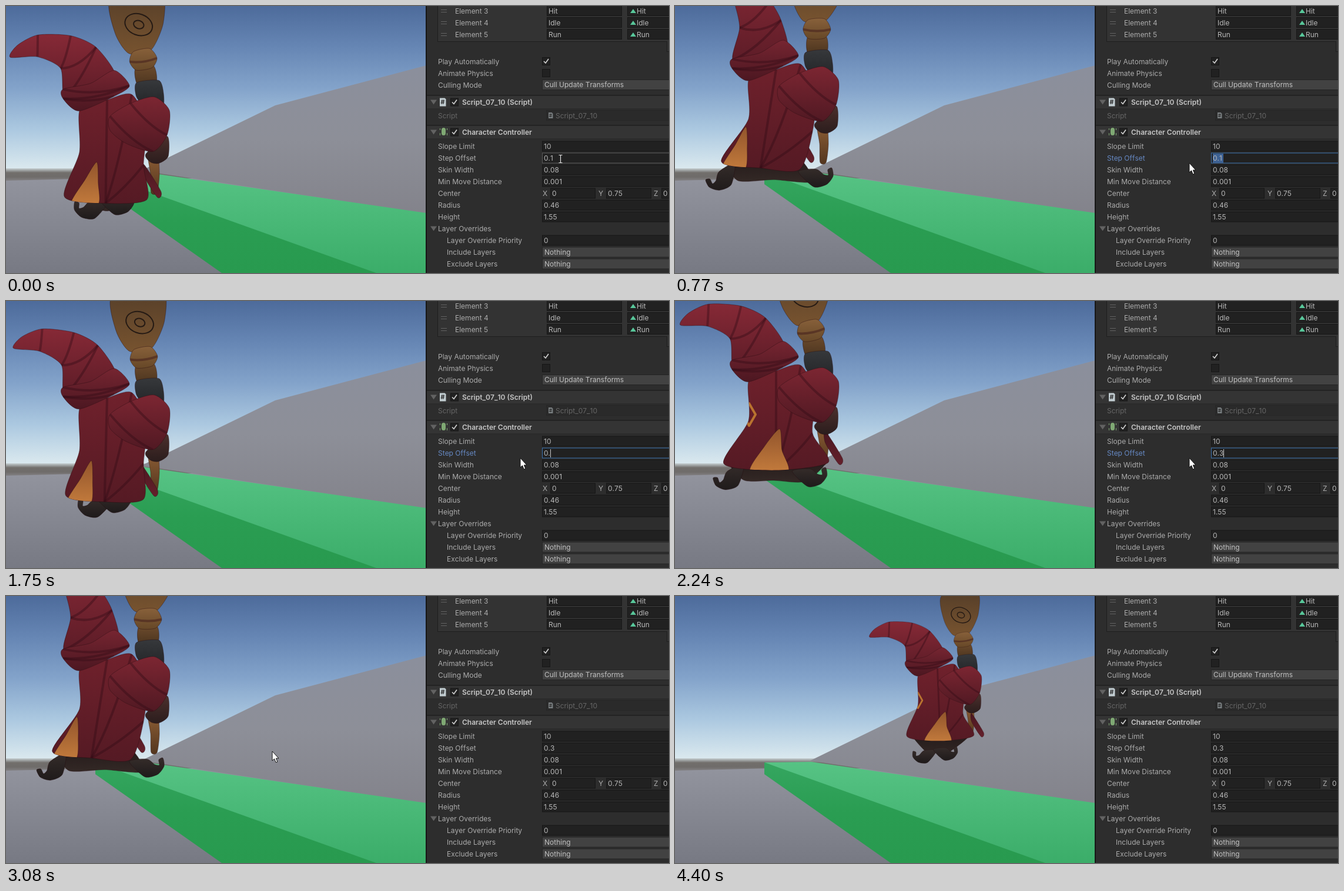
These frames come from a looping animation (1128 px wide and 454 px high, 4.47 s). An HTML page with a canvas:

```html
<!DOCTYPE html>
<html lang="en">
<head>
<meta charset="utf-8">
<title>Step offset demo</title>
<style>
html, body { margin: 0; width: 100%; height: 100%; overflow: hidden; background: #2d2d2d; }
canvas { display: block; }
</style>
</head>
<body>
<canvas id="stage" width="1128" height="454"></canvas>
<script>
const ctx = document.getElementById('stage').getContext('2d');
const LOOP = 4470, STEP = 70, CYCLE = 577.5, WALK = 3400;
const mix = (a, b, u) => a + (b - a) * u;
const clamp = u => Math.max(0, Math.min(1, u));
const ramp = (t, from, to) => clamp((t - from) / (to - from));
const smooth = u => u * u * (3 - 2 * u);

// ---------- basic drawing ----------
function rect(x, y, w, h, fill) { ctx.fillStyle = fill; ctx.fillRect(x, y, w, h); }
function grad(y0, y1, ...colors) {
  const g = ctx.createLinearGradient(0, y0, 0, y1);
  colors.forEach((color, i) => g.addColorStop(i / (colors.length - 1), color));
  return g;
}
function trace(points) {
  ctx.beginPath();
  for (let i = 0; i < points.length; i += 2) ctx.lineTo(points[i], points[i + 1]);
}
function poly(points, fill) {
  trace(points);
  ctx.fillStyle = fill;
  ctx.fill();
}
function line(points, color, width) {
  trace(points);
  ctx.strokeStyle = color;
  ctx.lineWidth = width;
  ctx.stroke();
}
function text(str, x, y, color = '#acacac', weight = 400, size = 12) {
  ctx.font = `${weight} ${size}px Inter, Roboto, sans-serif`;
  ctx.fontKerning = 'none';
  ctx.textBaseline = 'middle';
  ctx.fillStyle = color;
  ctx.fillText(str, x, y + 1);
}

// ---------- scene ----------
function scene() {
  rect(0, 0, 715, 279, grad(0, 279, '#4d6b9b', '#6686b4', '#83a3ca', '#abc8e0', '#dceaef'));
  rect(0, 276, 715, 22, grad(276, 298, '#c6d0d3', '#726f6c', '#6f6c6a', '#858386'));
  poly([0, 297, 160, 293, 715, 293, 715, 454, 0, 454], grad(293, 454, '#92949e', '#777983'));
  poly([230, 280, 458, 169, 715, 101, 715, 353], grad(101, 353, '#8b8f9c', '#8d8f98', '#83838b'));
  poly([152, 283, 232, 282, 715, 352, 715, 454, 600, 454], grad(282, 454, '#56c384', '#3bad69'));
  poly([152, 283, 630, 454, 367, 454, 152, 303], grad(283, 454, '#35a660', '#2a9d52', '#289a4f'));
}

// ---------- character ----------
// Moves an outline to (x, y); the turn of each point may grow with its distance.
function place(points, x, y, angle = 0, flip = 1, bend = 0) {
  const out = [];
  for (let i = 0; i < points.length; i += 2) {
    const px = points[i] * flip, py = points[i + 1];
    const a = angle + bend * Math.hypot(px, py) / 120;
    out.push(x + px * Math.cos(a) - py * Math.sin(a), y + px * Math.sin(a) + py * Math.cos(a));
  }
  return out;
}
// Closed soft curve through the points.
function blob(p) {
  const n = p.length, at = i => p[(i + n) % n], k = 8;
  ctx.beginPath();
  ctx.moveTo(p[0], p[1]);
  for (let i = 0; i < n; i += 2) {
    const c = j => at(i + j);
    ctx.bezierCurveTo(c(0) + (c(2) - c(-2)) / k, c(1) + (c(3) - c(-1)) / k,
      c(2) - (c(4) - c(0)) / k, c(3) - (c(5) - c(1)) / k, c(2), c(3));
  }
  ctx.closePath();
}
// Each fold joins two outline points with a dark bowed line.
function shape(p, top, bottom, folds = []) {
  const ys = p.filter((_, i) => i % 2);
  blob(p);
  ctx.fillStyle = grad(Math.min(...ys), Math.max(...ys), top, bottom);
  ctx.fill();
  ctx.strokeStyle = '#260b1066';
  ctx.lineWidth = 1;
  ctx.stroke();
  ctx.save();
  ctx.clip();
  ctx.strokeStyle = '#300c1566';
  ctx.lineWidth = 4;
  for (const [a, b, bow] of folds) {
    const [x0, y0, x1, y1] = [p[2 * a], p[2 * a + 1], p[2 * b], p[2 * b + 1]];
    ctx.beginPath();
    ctx.moveTo(x0, y0);
    ctx.quadraticCurveTo((x0 + x1) / 2, (y0 + y1) / 2 + bow, x1, y1);
    ctx.stroke();
  }
  ctx.restore();
}

const HAT = [-129, -88, -113, -105, -78, -113, -28, -100, 9, -75, 36, -24, -8, 4, -53, 8, -55, -45, -88, -74];
const COWL = [-55, -4, -8, -14, 32, -36, 58, -10, 32, 8, -28, 33, -55, 12];
const SLEEVE = [25, 42, 60, 20, 100, 9, 126, 32, 122, 74, 98, 102, 52, 88, 25, 66];
const HAND = [86, 106, 122, 76, 124, 110, 108, 122, 94, 120];
const FOOT = [-48, -26, -18, -30, -5, -21, 3, -20, 2, -29, 9, -32, 11, -18, 0, -4, -22, 0];
const HEAD = [-38, -170, 48, -170, 44, -115, 16, -72, -22, -72, -40, -110];
const BEAD = [-14, -74, 14, -75, 24, -57, 13, -42, -14, -42, -23, -58];
const GLOVE = [-20, -18, 18, -22, 26, 0, 24, 24, -6, 20, -20, 6];

function staff(x, y, tilt) {
  const head = place(HEAD, x, y, tilt);
  shape(head, '#553e29', '#77532f');
  const [cx, cy] = place([2, -118], x, y, tilt);
  ctx.strokeStyle = '#251a14';
  ctx.lineWidth = 2;
  for (const r of [9, 24]) {
    ctx.beginPath();
    ctx.ellipse(cx, cy, r, r * .75, .35, 0, 7);
    ctx.stroke();
  }
  shape(place([-15, -45, 16, -45, 16, -16, -15, -16], x, y, tilt), '#6b4a2c', '#4c351f');
  shape(place(BEAD, x, y, tilt), '#87603a', '#674828', [[5, 2, 6]]);
  shape(place(GLOVE, x, y), '#36383b', '#222427');
}

function figure(t) {
  const phase = 2 * Math.PI * (t - 770) / CYCLE;
  const wave = (n, lead) => Math.cos(n * (phase + 2 * Math.PI * lead));
  const lift = wave(2, .03);                 // two hops per run cycle
  const twist = .5 + .5 * wave(1, -.42);     // 0 side view, 1 back view
  const back = clamp((twist - .4) / .45);
  const swing = .06 + .28 * wave(1, .08) + .22 * wave(2, .08);
  const x = 152, y = 122 - 30 * lift, hem = 302 - 35 * lift;
  const left = 90 - 12 * lift, right = 208 + 62 * twist;
  const mid = 168, stride = 62 + 30 * lift;
  const sole = hem + 47 + 15 * wave(1, -.25);

  shape([-8, 110, 8, 110, 11, 140, 7, 172, -3, 172, -4, 140].map((v, i) => v + (i % 2 ? y : x + 98)), '#8a5c34', '#55371f');
  staff(x + 90, y + 3, -.11 + .09 * wave(1, 0));

  shape([left + 15, hem - 14, right - 8, hem - 14, mid + stride - 25, sole - 18, mid, mix(hem, sole, .55), mid - stride + 28, sole - 20], '#231a1a', '#332825');
  shape(place(FOOT, mid - stride, sole, -.35 - .3 * lift, -1), '#352c2a', '#1f1b1b');
  shape(place(FOOT, mid + stride, sole - 9), '#352c2a', '#1f1b1b');

  shape([right - 5, hem - 60, right + 24, hem - 14, right + 18, hem - 4, right - 5, hem - 40], '#4a1720', '#64202b');
  const robe = [x - 26, y + 30, x + 20, y + 14, x + 62, y + 5, x + 87, y + 55, x + 82, mix(y, hem, .68),
    right, hem + 10 - 20 * twist, mix(left, right, .5), hem + 6, left, hem - 5, x - 27, mix(y, hem, .56)];
  shape(robe, '#70212c', '#551a24', [[1, 6, 0], [2, 6, 30], [4, 6, 8]]);
  ctx.save();
  blob(robe);
  ctx.clip();
  const fx = left + 45 * back;
  shape([fx + 42 + 8 * back, hem - 64, fx + 44 + 10 * back, hem - 28, fx + 40 + 24 * back, hem + 8, fx, hem + 8, fx + 24, hem - 34], '#92552c', '#c27a3c');
  const dx = 100 + 26 * back, dy = mix(y, hem, .5), w = 11 * back;
  line([dx - w, dy, dx, dy - 19, dx + w, dy, dx, dy + 19, dx - w, dy, dx, dy - 19], '#b9732f', 4);
  ctx.restore();

  shape(place(HAT, x, y, 0, 1, swing), '#862936', '#5c1c27', [[9, 2, 12], [8, 3, 14], [8, 4, 18], [7, 4, 16]]);
  shape(place(COWL, x, y), '#762531', '#4c1721', [[0, 3, 16], [6, 3, 14], [6, 4, 10]]);
  shape(place(HAND, x, y), '#4c2f2c', '#2b1d1d');
  shape(place(SLEEVE, x, y), '#7c2632', '#511923', [[0, 5, 14], [1, 4, 12]]);
}

// After climbing the step, the walk recedes toward a vanishing point.
function character(t) {
  const scale = 1 / (1 + .00042 * Math.max(0, t - WALK));
  const climb = 45 * ramp(t, WALK, WALK + 200);
  ctx.save();
  ctx.beginPath();
  ctx.rect(0, 0, 714, 454);
  ctx.clip();
  ctx.translate(1100, 150);
  ctx.scale(scale, scale);
  ctx.translate(-1100, -150 - climb);
  ctx.lineJoin = 'round';
  figure(t);
  ctx.restore();
}

// ---------- inspector ----------
function box(x, y, w, border = '#171717') {
  rect(x, y - 9, w, 18, border);
  rect(x + 1, y - 8, w - 2, 16, '#212121');
}
function field(y, value, x = 912, w = 230, border) {
  box(x, y, w, border);
  text(value, x + 3, y, '#b8b8b8');
}
function dropdown(y, value) {
  rect(912, y - 9, 230, 18, '#242424');
  rect(913, y - 8, 230, 16, '#424242');
  text(value, 916, y - .5, '#c0c0c0');
}
function check(x, y, on) {
  rect(x, y - 7, 14, 14, '#161616');
  rect(x + 1, y - 6, 12, 12, '#212121');
  if (on) line([x + 3, y, x + 6, y + 3, x + 11, y - 4], '#d0d0d0', 1.7);
}
function foldout(y) { poly([722, y - 4, 733, y - 4, 727.5, y + 4], '#626262'); }
function page(x, y, h, color) {
  const w = h * .75;
  poly([x, y - h / 2, x + w - 2, y - h / 2, x + w, y - h / 2 + 2, x + w, y + h / 2, x, y + h / 2], color);
  text('#', x + w * .14, y - .5, '#2b2b2b', 700, h * .75);
}
function header(y, title) {
  rect(716, y - 11, 412, 22, '#343434');
  rect(716, y - 12, 412, 1, '#181818');
  rect(716, y + 11, 412, 1, '#292929');
  foldout(y);
  check(756, y, true);
  text(title, 776, y, '#c6c6c6', 600);
}

function inspector(t) {
  rect(714, 0, 414, 454, '#2d2d2d');
  rect(714, 0, 2, 454, '#171717');
  rect(734, 0, 394, 61, '#1e1e1e');
  rect(735, 0, 393, 60, '#333333');
  rect(1124, 60, 4, 18, '#1e1e1e');
  rect(1125, 60, 3, 17, '#333333');
  ['Hit', 'Idle', 'Run'].forEach((name, i) => {
    const y = 8 + i * 20;
    rect(740, y - 2, 10, 1, '#616161');
    rect(740, y + 2, 10, 1, '#616161');
    text('Element ' + (i + 3), 764, y);
    field(y, name, 920, 128);
    box(1057, y, 90);
    poly([1062, y + 4, 1067, y - 3, 1072, y + 4], '#58c79a');
    text(name, 1073, y + .5, '#b8b8b8');
  });

  text('Play Automatically', 735, 94.5);
  check(912, 94, true);
  text('Animate Physics', 735, 114.5);
  check(912, 114, false);
  text('Culling Mode', 735, 134.5);
  dropdown(134, 'Cull Update Transforms');

  header(163.5, 'Script_07_10 (Script)');
  page(738, 163.5, 14, '#c2cdd1');
  text('Script', 735, 186.5, '#666666');
  rect(919, 177, 210, 18, '#262626');
  rect(920, 178, 210, 16, '#2a2a2a');
  page(923, 186, 10, '#777c7e');
  text('Script_07_10', 935, 186.5, '#666666');

  header(214.5, 'Character Controller');
  ctx.fillStyle = '#7fa873';
  ctx.beginPath();
  ctx.roundRect(741, 207, 7, 13, 3.5);
  ctx.fill();
  for (const x of [738.5, 750.5]) {
    line([x, 208, x, 211], '#7fa873', 1);
    line([x, 216, x, 220], '#7fa873', 1);
  }

  const focus = t >= 210 && t < 3010;
  const labels = ['Slope Limit', 'Step Offset', 'Skin Width', 'Min Move Distance', 'Center', 'Radius', 'Height', 'Layer Overrides'];
  labels.forEach((label, i) => text(label, 735, 238.5 + i * 20, focus && i === 1 ? '#6689c4' : undefined));
  field(238.5, '10');
  field(278.5, '0.08');
  field(298.5, '0.001');
  [['X', '0', 913, 926], ['Y', '0.75', 1008, 1021], ['Z', '0', 1102, 1115]].forEach(([axis, value, lx, fx]) => {
    text(axis, lx, 318.5);
    field(318.5, value, fx, 77);
  });
  field(338.5, '0.46');
  field(358.5, '1.55');
  foldout(378.5);
  ['Layer Override Priority', 'Include Layers', 'Exclude Layers'].forEach((label, i) => text(label, 750, 398.5 + i * 20));
  field(398.5, '0');
  dropdown(418.5, 'Nothing');
  dropdown(438.5, 'Nothing');

  const typed = [1260, 1610, 1960].filter(at => t >= at).length;
  const value = typed ? '0.3'.slice(0, typed) : '0.1';
  box(912, 258.5, 230, focus ? '#3a72b0' : t < 210 ? '#5a5a5a' : '#171717');
  if (focus && !typed) rect(915, 251, 18, 16, '#3d6193');
  text(value, 915, 258.5, '#b8b8b8');
  if (focus && typed) rect(Math.round(915 + ctx.measureText(value).width), 252, 1, 14, '#c8c8c8');
}

// Drags over the field, clicks in the view, then leaves to the right.
function cursor(t) {
  if (t >= 4050) return;
  const drag = smooth(ramp(t, 210, 700)), away = smooth(ramp(t, 2800, 3010)), leave = ramp(t, 3780, 3980) ** 2;
  const x = 943 - 68 * drag - 422 * away + 295 * leave;
  const y = 260 + 7 * drag - 3 * away;
  if (x > 912) {
    line([x + .5, y - 6, x + .5, y + 6], '#e4e4e4', 1.2);
    for (const edge of [y - 6.5, y + 6.5]) line([x - 2.5, edge, x + 3.5, edge], '#e4e4e4', 1);
    return;
  }
  const arrow = place([0, 0, 0, 16, 3.6, 12.8, 6.2, 19, 8.8, 18, 6.4, 12, 11, 12, 0, 0], x, y);
  poly(arrow, '#ffffff');
  line(arrow, '#111111', 1);
}

// The picture advances in steps; one step near the end is 10 ms short.
function draw(now) {
  const ms = now % LOOP, base = ms < 3910 ? 0 : 3910;
  const t = base + Math.floor((ms - base) / STEP) * STEP;
  scene();
  character(t);
  inspector(t);
  cursor(t);
}
const start = performance.now();
function tick() {
  draw(performance.now() - start);
  requestAnimationFrame(tick);
}
tick();
</script>
</body>
</html>
```
